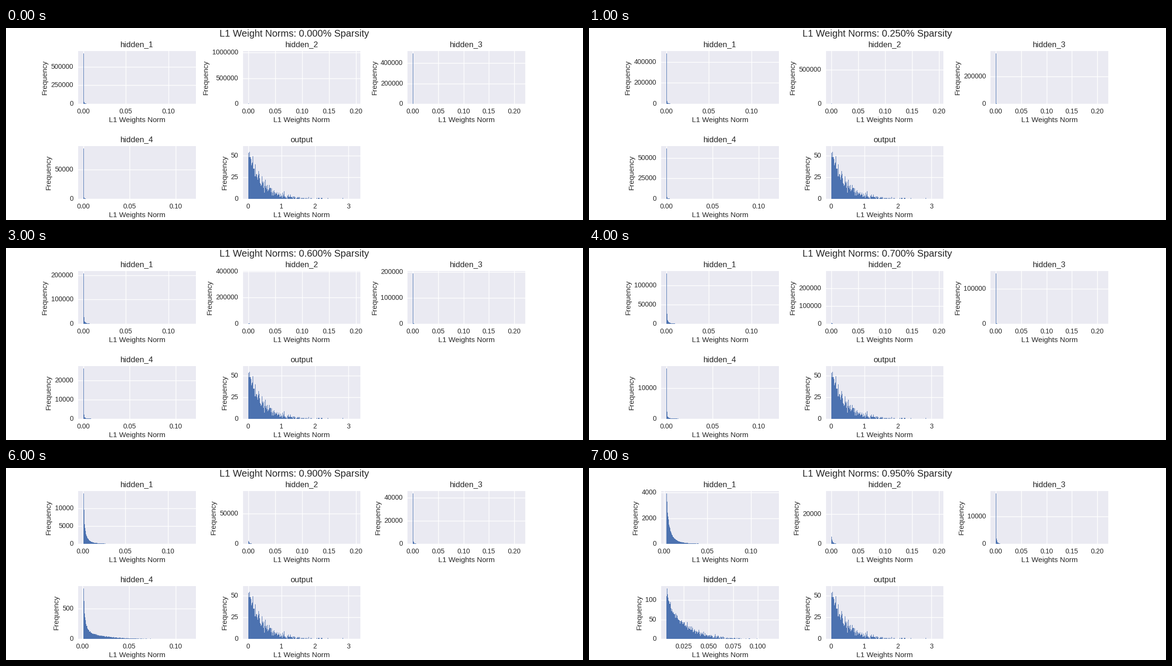
Write a matplotlib script that moves like this. It is 1200 by 400 pixels and loops after 8000 ms.

```python
import matplotlib.pyplot as plt
import numpy as np
from matplotlib.animation import FuncAnimation

INK = "#262626"
BLUE = "#4C72B0"
BINS = 300
JITTER = 60  # how far a sample may stray from its rank
SPARSITY = [0, 0.25, 0.5, 0.6, 0.7, 0.8, 0.9, 0.95]

plt.rcParams.update({
    "font.family": "Liberation Sans", "font.size": 12, "text.color": INK,
    "axes.facecolor": "#EAEAF2", "axes.linewidth": 0,
    "axes.axisbelow": True, "axes.grid": True, "axes.labelcolor": INK,
    "axes.labelsize": 11, "axes.titlesize": 12, "axes.titlepad": 6,
    "grid.color": "white", "grid.linewidth": 1, "grid.linestyle": "-",
    "xtick.color": INK, "ytick.color": INK,
    "xtick.labelsize": 10, "ytick.labelsize": 10,
    "xtick.major.size": 0, "ytick.major.size": 0,
    "xtick.major.pad": 6.3, "ytick.major.pad": 7,
    "ytick.alignment": "center",
})


def make_norms(size, top, a, p, b, q, seed):
    """Sorted norms; the share above t bins is exp(-(a*t**p + b*t**q))."""
    rng = np.random.default_rng(seed)
    share = (np.arange(size) + JITTER * rng.random(size)) / size % 1
    t = np.geomspace(1e-6, BINS, 2000)
    norms = np.interp(-np.log(share), a * t**p + b * t**q, t)
    return np.sort(norms) * top / BINS


LAYERS = {
    "hidden_1": (784_000, 0.126, 1.9, 0.165, 0.0875, 0.8),
    "hidden_2": (1_000_000, 0.1986, 3.867, 0.05, 0.243, 0.9),
    "hidden_3": (500_000, 0.2112, 4.1, 0.04, 0.24, 0.95),
    "hidden_4": (100_000, 0.1159, 1.99, 0.13, 0.00054, 1.7),
    "output": (2_000, 3.206, 0, 1, 0.028, 1),
}


class Panel:
    def __init__(self, ax, name, params, seed):
        self.ax, self.top = ax, params[1]
        self.norms = make_norms(*params, seed)
        self.bars = ax.bar(np.arange(BINS), np.ones(BINS), color=BLUE, lw=0)
        ax.set_title(name)
        ax.set_xlabel("L1 Weights Norm", labelpad=3.3)
        ax.set_ylabel("Frequency", labelpad=4)
        ax.ticklabel_format(style="plain", useOffset=False)

    def show(self, sparsity):
        """Draw the histogram left after pruning the smallest norms."""
        kept = self.norms[round(sparsity * len(self.norms)):]
        lo, hi = kept[0], self.top
        counts, edges = np.histogram(kept, BINS, (lo, hi))
        for bar, x, n in zip(self.bars, edges, counts):
            bar.set_bounds(x, 0, (hi - lo) / BINS, n)
        margin = 0.05 * (hi - lo)
        self.ax.set_xlim(lo - margin, hi + margin)
        self.ax.set_ylim(0, 1.05 * counts.max())


fig, axes = plt.subplots(
    2, 3, figsize=(12, 4), dpi=100, facecolor="white",
    gridspec_kw=dict(left=0.125, right=0.9, bottom=0.11, top=0.88,
                     wspace=0.4, hspace=0.8))
axes = axes.ravel()
axes[5].remove()
heading = fig.suptitle("", y=0.9925, fontsize=14.4)

panels = [Panel(ax, name, params, seed)
          for seed, (ax, (name, params)) in enumerate(zip(axes, LAYERS.items()))]
*hidden, output = panels
output.show(0)  # the output layer is never pruned


def update(i):
    heading.set_text(f"L1 Weight Norms: {SPARSITY[i]:.3f}% Sparsity")
    for panel in hidden:
        panel.show(SPARSITY[i])
    return []


anim = FuncAnimation(fig, update, frames=len(SPARSITY), interval=1000,
                     repeat=True, repeat_delay=0, blit=False)
plt.show()
```
